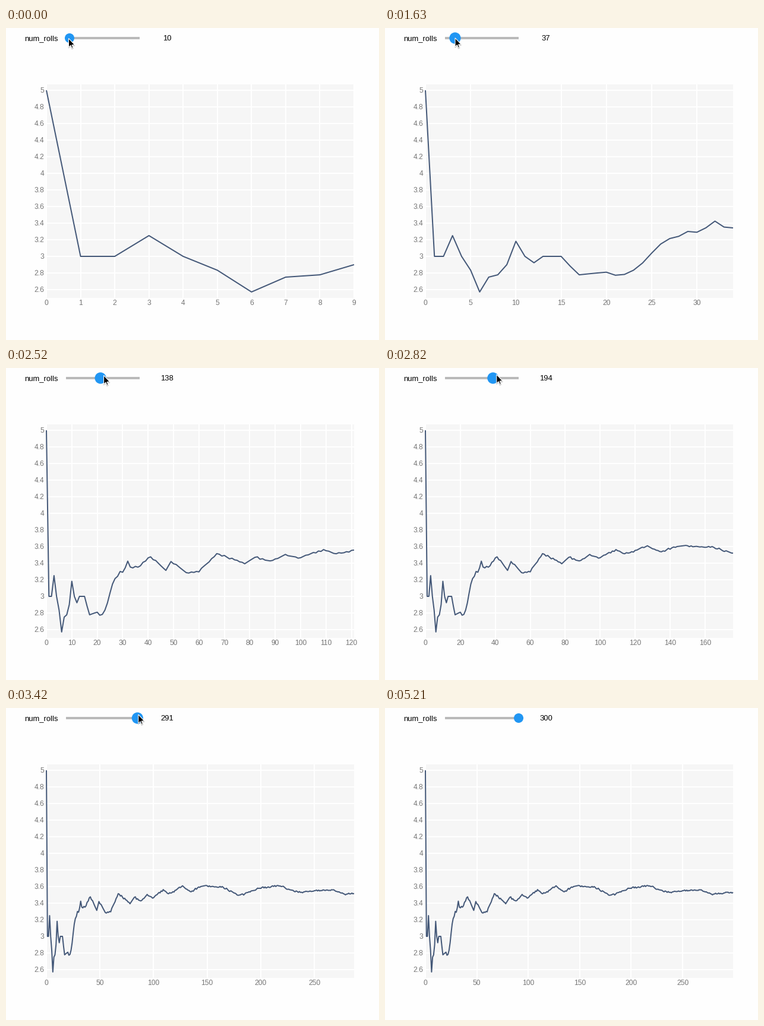
Write a matplotlib script that moves like this. It is 628x526 px and loops after 8 s.

```python
import numpy as np
import matplotlib.pyplot as plt
from matplotlib.animation import FuncAnimation
from matplotlib.patches import Circle, Polygon, Rectangle

W, H, DPI = 628, 526, 100
LOOP_MS, STEP_MS = 8000, 40
PX = 72 / DPI  # points per pixel

LEFT, RIGHT, TOP, BOTTOM = 68, 586, 95, 455
PAGE, PLOT_BG, LINE, TICK = "#fefefe", "#f6f6f6", "#445878", "#757575"
TRACK, HANDLE = "#bababa", "#2196f3"
MAX_ROLLS = 300

# The screen refreshes in even beats; the plot trails the slider, the mouse leads it.
FIRST_BEAT, BEAT_MS, LAG = 591, 148.4, 0.6
RELEASE, LEAVE = 24, 31

# Drag path: (beat, slider value).
DRAG = [(1, 10), (2.4, 25), (3, 25), (6, 34), (7, 37), (9, 50), (10, 68),
        (11, 83), (15, 194), (18, 286), (19, 291), (20, 303), (21, 308)]

# Turning points of the running mean: (roll index, mean).
TURNS = [(0, 5), (1, 3), (2, 3), (3, 3.25), (6, 2.57), (7, 2.75), (9, 2.9),
         (10, 3.18), (11, 3), (12, 2.92), (13, 3), (15, 3), (17, 2.78),
         (20, 2.81), (21, 2.77), (23, 2.83), (26, 3.15), (29, 3.3),
         (30, 3.29), (32, 3.42), (33, 3.35), (36, 3.35), (41, 3.48),
         (47, 3.31), (49, 3.42), (55, 3.29), (60, 3.3), (67, 3.515),
         (78, 3.4), (82, 3.47), (88, 3.43), (94, 3.5), (99, 3.46),
         (109, 3.56), (114, 3.51), (127, 3.6), (134, 3.54), (146, 3.61),
         (165, 3.59), (179, 3.49), (199, 3.58), (216, 3.61), (235, 3.53),
         (267, 3.56), (278, 3.505), (299, 3.53)]

ARROW = np.array([(0, 0), (0, 15), (3.4, 11.8), (5.5, 16.6), (7.6, 15.7),
                  (5.6, 11), (10.3, 11)])


def along(points, x):
    return np.interp(x, *zip(*points))


def running_means():
    """Roll dice whose mean follows the turning points with a little noise."""
    rng = np.random.default_rng(4)
    totals = [0]
    for i in range(MAX_ROLLS):
        wanted = along(TURNS, i) * (i + 1) - totals[-1]
        roll = round(wanted + rng.normal(0, max(0, i - 30) / 150))
        totals.append(totals[-1] + min(max(roll, 1), 6))
    return np.array(totals[1:]) / np.arange(1, MAX_ROLLS + 1)


def y_pixel(value):
    return 105 + (5 - value) * 140


def x_pixel(index, count):
    return LEFT + (RIGHT - LEFT) * index / (count - 1)


def slider_x(value):
    return 225 - (MAX_ROLLS - value) * 0.407


def slider_value(beat):
    return min(MAX_ROLLS, round(along(DRAG, beat)))


def mouse_tip(beat):
    x = slider_x(along(DRAG, beat + LAG)) - 1.5
    y = along([(6, 17.5), (15, 11), (LEAVE - 2, 11), (LEAVE - 1, 1)], beat)
    return np.array([x, y])


def tick_step(last):
    return next(s for s in (1, 2, 5, 10, 20, 50) if last / s <= 13)


def label(x, y, text, size, color, ha):
    return ax.text(x, y, text, fontsize=size * PX, color=color, ha=ha,
                   va="baseline", family="Liberation Sans")


means = running_means()

fig = plt.figure(figsize=(W / DPI, H / DPI), dpi=DPI, facecolor=PAGE)
ax = fig.add_axes([0, 0, 1, 1])
ax.set_xlim(0, W)
ax.set_ylim(H, 0)
ax.axis("off")

ax.add_patch(Rectangle((LEFT, TOP), RIGHT - LEFT, BOTTOM - TOP,
                       color=PLOT_BG, lw=0, zorder=0))
grid_style = dict(colors="white", lw=2 * PX, zorder=1)
levels = np.arange(13) * 0.2 + 2.6
ax.hlines(y_pixel(levels), LEFT, RIGHT, **grid_style)
for level in levels:
    label(64, y_pixel(level) + 4, f"{level:.1f}".removesuffix(".0"),
          12, TICK, "right")
columns = ax.vlines([], TOP, BOTTOM, **grid_style)
x_labels = [label(0, 467, "", 12, TICK, "center") for _ in range(14)]
curve, = ax.plot([], [], color=LINE, lw=2 * PX, zorder=2,
                 solid_joinstyle="round", solid_capstyle="butt")

label(31, 21, "num_rolls", 13, "black", "left")
readout = label(271, 21, "", 13, "black", "center")
ax.add_patch(Rectangle((101, 15), 124, 4, color=TRACK, lw=0, zorder=3))
handle = ax.add_patch(Circle((0, 17), 8, color=HANDLE, lw=0, zorder=4))
shadow = ax.add_patch(Polygon(ARROW, color="black", alpha=0.18, lw=1.5 * PX,
                              zorder=5))
cursor = ax.add_patch(Polygon(ARROW, facecolor="black", edgecolor="white",
                              lw=1.1 * PX, joinstyle="miter", zorder=6))


def draw(frame):
    now = frame * STEP_MS + 30  # show a beat in the frame nearest to it
    beat = (now - FIRST_BEAT) // BEAT_MS
    value, count = slider_value(beat), slider_value(beat - LAG)

    curve.set_data(x_pixel(np.arange(count), count), y_pixel(means[:count]))
    ticks = np.arange(0, count, tick_step(count - 1))
    xs = x_pixel(ticks, count)
    columns.set_segments([[(x, TOP), (x, BOTTOM)] for x in xs])
    for i, text in enumerate(x_labels):
        shown = i < len(ticks)
        text.set_text(str(ticks[i]) if shown else "")
        text.set_x(xs[i] if shown else 0)

    readout.set_text(str(value))
    handle.center = (slider_x(value), 17)
    handle.set_radius(9.6 if 0 <= beat < RELEASE else 8)
    tip = mouse_tip(beat)
    for patch, drop in ((cursor, 0), (shadow, 1.2)):
        patch.set_visible(bool(beat < LEAVE))
        patch.set_xy(ARROW + tip + (0, drop))
    return ()


anim = FuncAnimation(fig, draw, frames=LOOP_MS // STEP_MS, interval=STEP_MS,
                     repeat=True, repeat_delay=0, blit=False)
plt.show()
```
